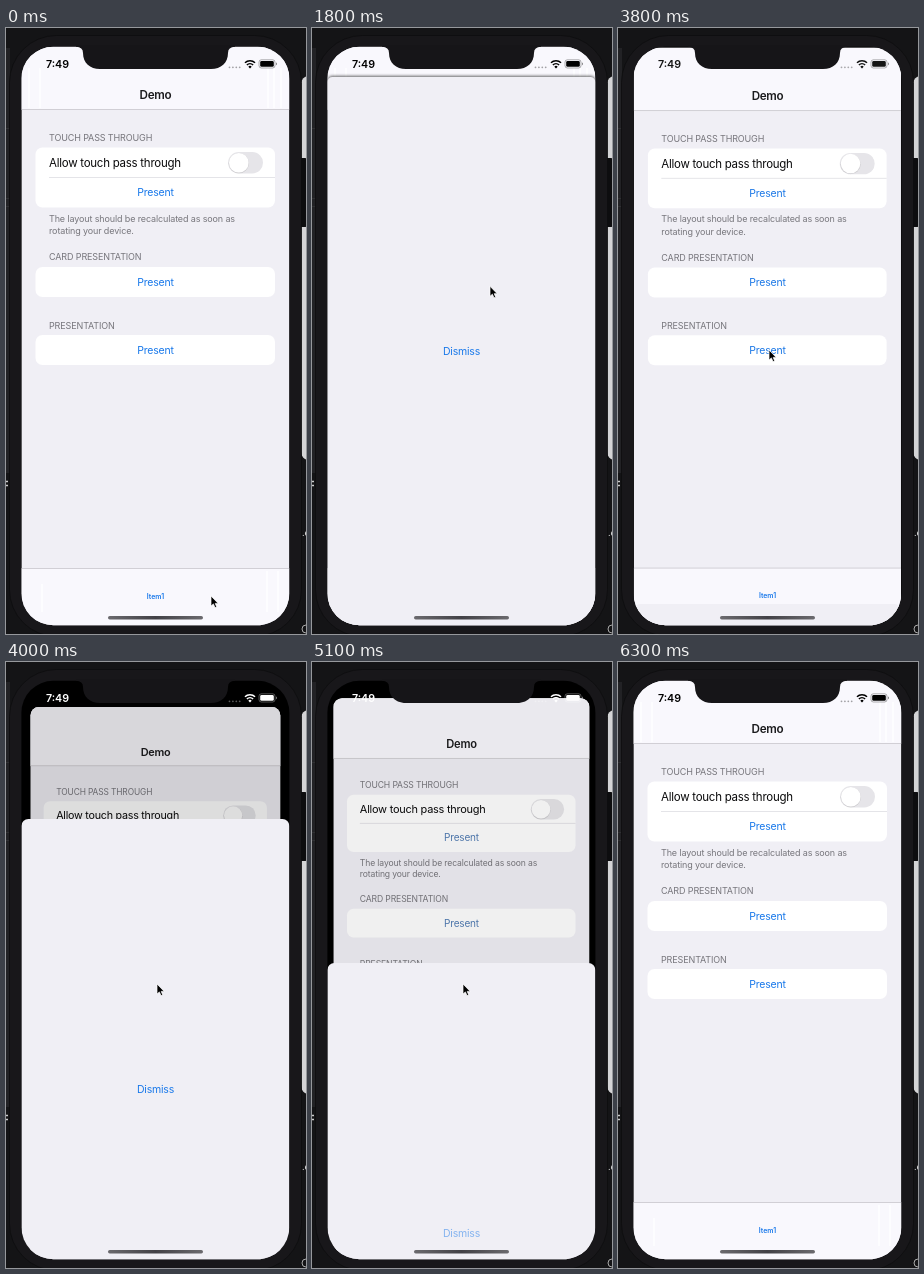
Write an HTML page that moves like this. It is 300 px wide and 606 px high and loops after 7900 ms.

```html
<!DOCTYPE html>
<html lang="en">
<head>
<meta charset="utf-8">
<title>Card presentation demo</title>
<style>
  html, body { margin: 0; height: 100%; overflow: hidden; background: #141416; }
  svg { display: block; width: 100vw; height: 100vh; }
  text { font-family: Inter, "Liberation Sans", sans-serif; }
  .mid { text-anchor: middle; }
  .title { font-size: 11.7px; font-weight: 600; letter-spacing: -.3px; fill: #1b1b1d; }
  .note { font-size: 9px; letter-spacing: -.13px; fill: #77767c; }
  .label { font-size: 11.5px; letter-spacing: -.26px; fill: #0b0b0c; }
  .button { font-size: 10.5px; letter-spacing: -.2px; fill: #1878ea; }
  .tab { font-size: 6.9px; font-weight: 600; fill: #1878ea; }
  #back .button { fill: var(--tint); }
  .row { fill: #fff; }
  .line { stroke: #c8c7cc; stroke-width: .8; }
  .thin { stroke: #dedde2; stroke-width: .8; }
  .page { fill: #f0eff5; }
  .bar { fill: #f9f8fd; }
  .glint { stroke: #fff; stroke-width: 2; }
  #card { filter: drop-shadow(0 -1px 1.6px #0009); }
</style>
</head>
<body>
<svg viewBox="0 0 300 606">
  <defs>
    <clipPath id="screen"><rect x="15.400" y="18.700" width="268" height="578.600" rx="32"/></clipPath>
    <clipPath id="pageEdge"><rect x="15.400" y="18.500" width="268" height="600" rx="9"/></clipPath>
    <linearGradient id="grip">
      <stop stop-color="#6b6a6e"/><stop offset=".5" stop-color="#424146"/><stop offset="1" stop-color="#6b6a6e"/>
    </linearGradient>
  </defs>

  <!-- desktop around the phone -->
  <rect width="300" height="606" fill="#141416"/>
  <path d="M0 20H4V445H0Z" fill="#222225"/>
  <path d="M0 100.500H4M0 170.500H4M0 178.500H4" stroke="#303033"/>
  <rect x="295" y="48" width="20" height="384" rx="8" fill="#d4d4d6"/>
  <path d="M0 453.500H2M0 457.500H2" stroke="#ccc" stroke-width="1.500"/>
  <text x="296" y="508" font-size="9" fill="#ddd">.e</text>
  <circle cx="300" cy="601" r="4" fill="none" stroke="#aaa"/>

  <!-- phone body -->
  <rect x="293" y="130" width="8" height="69" rx="2" fill="#0d0d0f"/>
  <rect x="3.500" y="7.500" width="292" height="601" rx="47" fill="#18171a" stroke="#0d0d0f" stroke-width=".8"/>

  <g clip-path="url(#screen)">
    <rect x="15" y="18" width="269" height="580"/>
    <g id="back"><g clip-path="url(#pageEdge)">
      <rect class="page" x="15" y="18" width="269" height="600"/>
      <rect class="bar" x="15" y="18" width="269" height="63.500"/>
      <path class="line" d="M15 81.500H284"/>
      <rect class="bar" x="15" y="540.500" width="269" height="60"/>
      <path class="line" d="M15 540.500H284"/>
      <path id="glints" class="glint" d="M23 40V80M34 40V80M262 40V80M268 40V80M275 40V80M36 556V584M261 543V584M272 543V584"/>
      <text class="title mid" x="149.500" y="70.500">Demo</text>

      <text class="note" x="43" y="112.800">TOUCH PASS THROUGH</text>
      <rect class="row" x="29.500" y="119.500" width="239.500" height="60" rx="7"/>
      <path class="thin" d="M43 149.500H269"/>
      <text class="label" x="43" y="138.700">Allow touch pass through</text>
      <rect x="222" y="124" width="35" height="21.500" rx="10.750" fill="#e6e5e9"/>
      <circle cx="232.800" cy="135.300" r="10.200" fill="#000" opacity=".1"/>
      <circle cx="232.800" cy="134.700" r="9.800" fill="#fff"/>
      <text class="button mid" x="149.500" y="168.300">Present</text>
      <text class="note" x="43" y="193.800">The layout should be recalculated as soon as</text>
      <text class="note" x="43" y="206">rotating your device.</text>

      <text class="note" x="43" y="232">CARD PRESENTATION</text>
      <rect class="row" x="29.500" y="239" width="239.500" height="30" rx="7"/>
      <text class="button mid" x="149.500" y="257.800">Present</text>

      <text class="note" x="43" y="300.500">PRESENTATION</text>
      <rect class="row" x="29.500" y="307" width="239.500" height="30" rx="7"/>
      <text class="button mid" x="149.500" y="326">Present</text>

      <text class="tab mid" x="149.500" y="571">Item1</text>
      <rect id="dim" x="15" y="18" width="269" height="600"/>
    </g></g>

    <g id="card">
      <rect class="page" x="15.400" width="268" height="620" rx="5"/>
      <text class="button mid" x="149.500" y="277.500">Dismiss</text>
    </g>
    <g id="sheet">
      <rect class="page" x="15.400" width="268" height="620" rx="7"/>
      <text class="button mid" x="149.500" y="273.700">Dismiss</text>
    </g>

    <g id="status" fill="currentColor">
      <text x="39.900" y="40.300" font-size="10.700" font-weight="600">7:49</text>
      <path d="M223.500 39.300H236" stroke="currentColor" stroke-width="1.800" stroke-linecap="round" stroke-dasharray="0 3.400" opacity=".35"/>
      <path d="M239 34.800a7 7 0 0 1 10 0M240.900 37a4.400 4.400 0 0 1 6.200 0" fill="none" stroke="currentColor" stroke-width="1.600"/>
      <path d="M244 40.600l-1.700-1.800a2.300 2.300 0 0 1 3.400 0z"/>
      <rect x="253" y="31.800" width="16" height="8.200" rx="2.400" fill="none" stroke="currentColor" stroke-width=".8" opacity=".4"/>
      <rect x="254.200" y="33" width="13.600" height="5.800" rx="1.400"/>
      <path d="M270 34.500a1.500 1.500 0 0 1 0 2.800z" opacity=".5"/>
    </g>
    <rect x="102" y="588" width="95" height="3.400" rx="1.700" fill="url(#grip)"/>
  </g>
  <path d="M70 17V18.800Q77 19 77 25C77 35 84 41 94 41H205C215 41 222 35 222 25Q222 19 229 18.800V17Z" fill="#161518"/>

  <path id="cursor" d="M0 0V10L2.400 7.900 4 11.600 5.700 10.900 4.200 7.400H7.200Z" stroke="#fff" stroke-width=".7"/>
</svg>
<script>
const LOOP = 7900, STEP = 100, BOTTOM = 597;
const [back, glints, dim, card, sheet, status, cursor] =
  ["back", "glints", "dim", "card", "sheet", "status", "cursor"].map(id => document.getElementById(id));

// Critically damped spring: 0 before the start, then settles at 1.
function spring(t, start, speed = 14) {
  const x = Math.max(0, t - start) / 1000 * speed;
  const rest = (1 + x) * Math.exp(-x);
  return rest < .006 ? 1 : 1 - rest;
}

// start, end, three curve points, easing on or off
const moves = [
  [0, 700, [205, 568], [196, 400], [169, 251], true],
  [1400, 2200, [169, 251], [196, 230], [151, 322], true],
  [5900, 6200, [151, 322], [66, 240], [271, 90], false]
];

function cursorAt(t) {
  const [start, end, a, b, c, eased] = moves.findLast(m => t >= m[0]);
  let u = Math.min(1, (t - start) / (end - start));
  if (eased) u = u * u * (3 - 2 * u);
  return [0, 1].map(i => (1 - u) ** 2 * a[i] + 2 * u * (1 - u) * b[i] + u * u * c[i]);
}

function mix(from, to, part) {
  return `rgb(${from.map((v, i) => Math.round(v + (to[i] - v) * part))})`;
}

function place(panel, shown, top, leaving) {
  panel.style.display = shown > 0 ? "" : "none";
  panel.setAttribute("transform", `translate(0 ${BOTTOM + (top - BOTTOM) * shown})`);
  panel.lastElementChild.setAttribute("opacity", leaving ? .5 : 1);
}

function draw(t) {
  place(card, spring(t, 800, 27) - spring(t, 2364), 49, t >= 2364);

  const p = spring(t, 3778) - spring(t, 4991);
  place(sheet, p, 58, t >= 4991);
  back.setAttribute("transform",
    `translate(149.5 ${18.5 + 32.5 * p}) scale(${1 - .083 * p}) translate(-149.5 -18.5)`);
  back.style.setProperty("--tint", mix([24, 120, 234], [130, 130, 135], p));
  dim.setAttribute("opacity", .2 * p * p);
  glints.setAttribute("opacity", p > 0 ? 0 : .7);
  status.style.color = mix([0, 0, 0], [255, 255, 255], Math.min(1, 2 * p));

  cursor.setAttribute("transform", `translate(${cursorAt(t)})`);
  cursor.style.display = t < 6300 ? "" : "none";
}

// The screen refreshes ten times per second.
function tick() {
  draw(Math.floor(performance.now() % LOOP / STEP) * STEP);
  requestAnimationFrame(tick);
}
tick();
</script>
</body>
</html>
```
